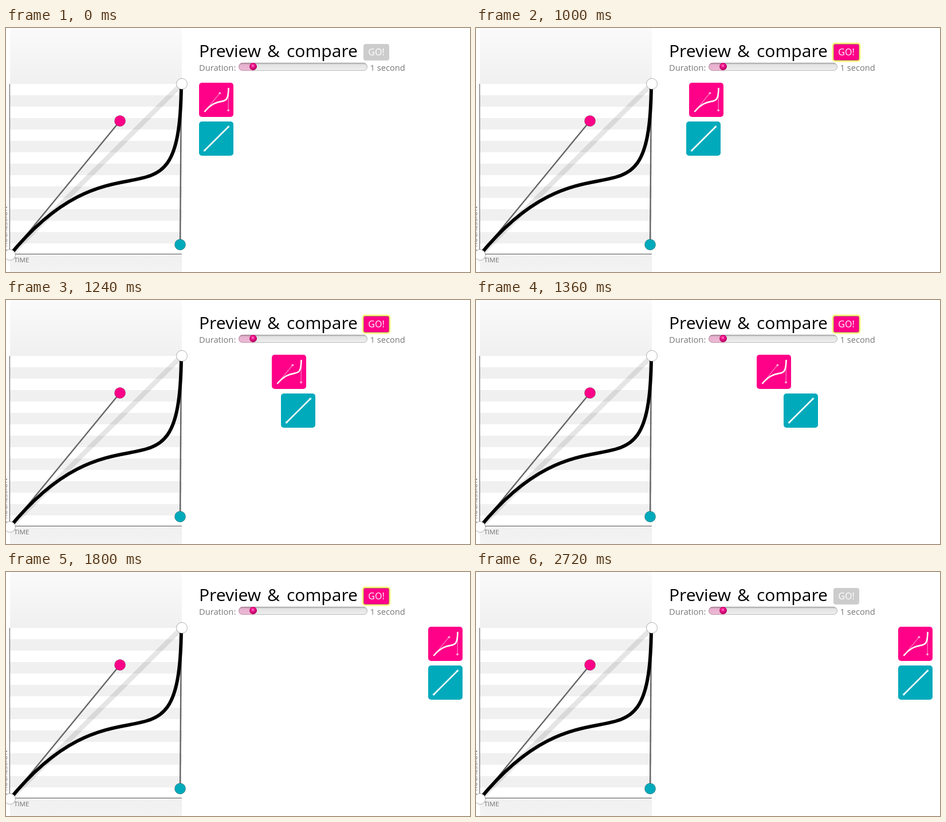
These frames come from a looping animation (810 by 428 pixels, 2.8 s). An HTML page:

```html
<!DOCTYPE html>
<html lang="en">
<head>
<meta charset="utf-8">
<title>Preview &amp; compare</title>
<style>
html, body { margin: 0; width: 100%; height: 100%; overflow: hidden; background: #fff; }
svg { display: block; width: 810px; height: 428px; }
text { font-family: "Open Sans", "Noto Sans", sans-serif; }
.small { font-size: 11.5px; fill: #707070; }
.label { font-size: 14.7px; fill: #777; }
</style>
</head>
<body>
<svg viewBox="0 0 810 428" xmlns="http://www.w3.org/2000/svg">
  <defs>
    <linearGradient id="fadeIn" x1="0" y1="0" x2="0" y2="1">
      <stop offset="0" stop-color="#fafafa"/><stop offset="1" stop-color="#f0f0f0"/>
    </linearGradient>
    <linearGradient id="fadeOut" x1="0" y1="0" x2="0" y2="1">
      <stop offset="0" stop-color="#f0f0f0"/><stop offset="1" stop-color="#f3f3f3"/>
    </linearGradient>
    <linearGradient id="groove" x1="0" y1="0" x2="0" y2="1">
      <stop offset="0" stop-color="#000" stop-opacity=".22"/>
      <stop offset=".3" stop-color="#000" stop-opacity=".04"/>
      <stop offset="1" stop-color="#000" stop-opacity="0"/>
    </linearGradient>
    <radialGradient id="knob" cx=".45" cy=".4" r=".6">
      <stop offset="0" stop-color="#ff8cc8"/>
      <stop offset=".4" stop-color="#f0108a"/>
      <stop offset="1" stop-color="#a80058"/>
    </radialGradient>
    <pattern id="stripes" x="0" y="98" width="40" height="40" patternUnits="userSpaceOnUse">
      <rect width="40" height="20" fill="#fff"/>
      <rect y="20" width="40" height="20" fill="#f0f0f0"/>
    </pattern>
    <clipPath id="plane"><rect x="7" y="98" width="300" height="298"/></clipPath>
    <clipPath id="track"><rect x="406" y="61" width="225" height="14" rx="7"/></clipPath>
    <filter id="soft" x="-20%" y="-30%" width="140%" height="160%">
      <feGaussianBlur stdDeviation=".8"/>
    </filter>
  </defs>

  <rect width="810" height="428" fill="#fff"/>
  <rect x="7" width="300" height="98" fill="url(#fadeIn)"/>
  <rect x="7" y="397" width="300" height="31" fill="url(#fadeOut)"/>
  <rect x="7" y="98" width="300" height="298" fill="url(#stripes)"/>
  <path d="M-3 408L317 88" stroke="#000" stroke-opacity=".1" stroke-width="8.5" clip-path="url(#plane)"/>
  <path d="M6.5 98V396.5H307" fill="none" stroke="#555"/>
  <text class="small" x="14" y="411">TIME</text>
  <text class="small" transform="translate(2 391) rotate(-90)">PROGRESSION</text>
  <g id="graph" fill="none"></g>

  <text y="51" font-size="30"><tspan x="337">Preview</tspan> <tspan x="456">&amp;</tspan> <tspan x="490">compare</tspan></text>
  <g id="glow">
    <rect x="622" y="26" width="49" height="33" rx="5" fill="#ffff50" filter="url(#soft)"/>
    <rect x="623" y="27" width="47" height="31" rx="4" fill="#f4ea5c"/>
  </g>
  <rect id="button" x="624" y="28" width="45" height="29" rx="4"/>
  <rect id="edge" x="624.5" y="28.5" width="44" height="28" rx="3.5" fill="none" stroke="#b06a80"/>
  <text x="646.5" y="48" font-size="16" text-anchor="middle" fill="#fff">GO!</text>

  <text class="label" x="337" y="75">Duration:</text>
  <text class="label" x="635.5" y="75">1 second</text>
  <g clip-path="url(#track)">
    <rect x="406" y="61" width="225" height="14" fill="#eee"/>
    <rect x="406" y="61" width="26" height="14" fill="#efb9d6"/>
    <rect x="406" y="61" width="225" height="14" fill="url(#groove)"/>
  </g>
  <rect x="406.5" y="61.5" width="224" height="13" rx="6.5" fill="none" stroke="#000" stroke-opacity=".22"/>
  <circle cx="431.5" cy="67.5" r="6.5" fill="url(#knob)"/>

  <g id="curved"></g>
  <g id="linear"></g>
</svg>
<script>
const PINK = '#ff0088', TEAL = '#00aabb';
const EASE = [0.64, 0.78, 0.99, 0.06];
const LOOP = 2800, STEP = 40, START = 935.5, RUN = 850;
const $ = id => document.getElementById(id);

const place = (x0, y0, size) => (x, y) => [x0 + x * size, y0 - y * size];
const line = (a, b, attrs) => `<path d="M${a}L${b}" ${attrs}/>`;
const dot = (p, r, attrs) => `<circle cx="${p[0]}" cy="${p[1]}" r="${r}" ${attrs}/>`;
const curve = (pts, width, color) =>
  `<path d="M${pts[0]}C${pts.slice(1).join(' ')}" fill="none" stroke="${color}" stroke-width="${width}"/>`;
const points = (at, [x1, y1, x2, y2]) => [at(0, 0), at(x1, y1), at(x2, y2), at(1, 1)];

function drawGraph() {
  const p = points(place(7, 398, 300), EASE);
  p[1] = [199, 163];
  p[2] = [304, 380];
  p[3] = [306, 98];
  const arm = 'stroke="#646464" stroke-width="2.4"';
  const rim = 'stroke="#000" stroke-opacity=".3"';
  $('graph').innerHTML = line(p[0], p[1], arm) + line(p[3], p[2], arm) +
    curve(p, 6, '#000') +
    dot([7, 398], 9.5, `fill="#fff" ${rim}`) +
    dot([307, 98], 9.5, `fill="#fff" ${rim}`) +
    dot(p[1], 9.5, `fill="${PINK}" ${rim}`) +
    dot(p[2], 9.5, `fill="${TEAL}" ${rim}`);
}

function drawTile(id, color, ease) {
  const p = points(place(9.5, 51, 42), ease);
  const arm = 'stroke="#fff" stroke-opacity=".5" stroke-width="1.2"';
  const tip = 'fill="#fff" fill-opacity=".6"';
  $(id).innerHTML = `<rect width="60" height="60" rx="5" fill="${color}"/>` +
    line(p[0], p[1], arm) + line(p[3], p[2], arm) +
    curve(p, 2.6, '#fff') + dot(p[1], 2, tip) + dot(p[2], 2, tip);
}

const cubic = (a, b, t) => 3 * (1 - t) * (1 - t) * t * a + 3 * (1 - t) * t * t * b + t * t * t;

function eased(x) {
  if (x <= 0 || x >= 1) return x;
  let lo = 0, hi = 1;
  for (let i = 0; i < 30; i++) {
    const mid = (lo + hi) / 2;
    if (cubic(EASE[0], EASE[2], mid) < x) lo = mid; else hi = mid;
  }
  return cubic(EASE[1], EASE[3], lo);
}

function slide(id, amount, y) {
  $(id).setAttribute('transform', `translate(${Math.round(337 + 400 * amount)} ${y})`);
}

function render(ms) {
  const t = Math.floor((ms % LOOP) / STEP) * STEP;
  const p = Math.min(1, Math.max(0, (t - START) / RUN));
  const active = t >= 640 && t < 2160;
  const focus = t >= 880 && t < 2720;
  slide('curved', eased(p), 96);
  slide('linear', p, 164);
  $('button').setAttribute('fill', active ? PINK : '#ccc');
  $('glow').style.display = focus ? '' : 'none';
  $('edge').style.display = focus ? '' : 'none';
}

drawGraph();
drawTile('curved', PINK, EASE);
drawTile('linear', TEAL, [0, 0, 1, 1]);

const begin = performance.now();
function tick() {
  render(performance.now() - begin);
  requestAnimationFrame(tick);
}
tick();
</script>
</body>
</html>
```
